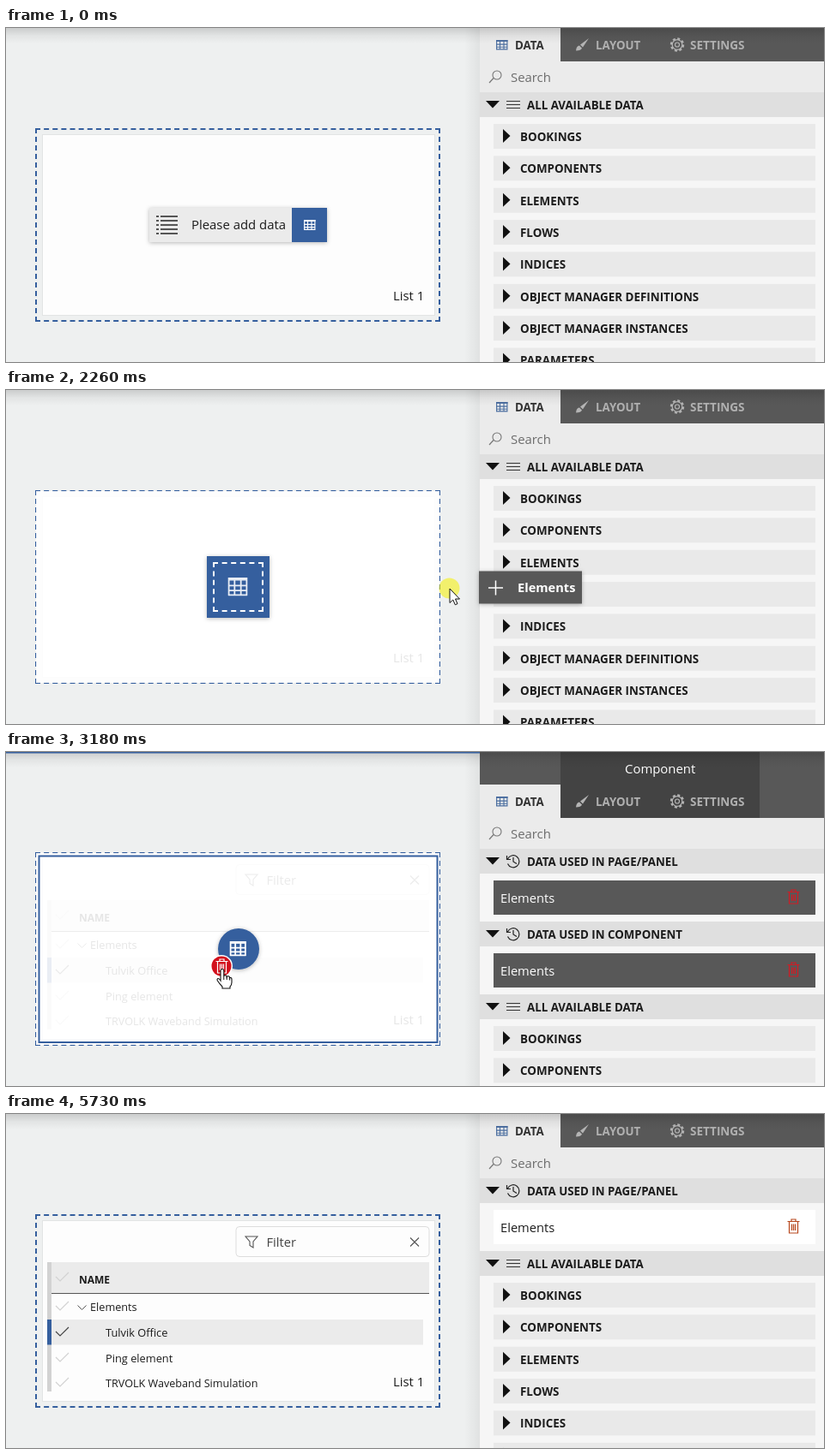
Animation of 953 by 390 pixels, one loop 6.46 s. Source, as an HTML page:

```html
<!DOCTYPE html>
<html lang="en">
<head>
<meta charset="utf-8">
<style>
html, body { margin: 0; width: 100%; height: 100%; overflow: hidden; background: #eef0f0; }
svg { display: block; font: 14.9px "Open Sans", "Noto Sans", sans-serif; }
</style>
</head>
<body>
<svg width="953" height="390" viewBox="0 0 953 390">
  <defs>
    <linearGradient id="top" x2="0" y2="1"><stop stop-opacity=".15"/><stop offset=".5" stop-opacity=".05"/><stop offset="1" stop-opacity="0"/></linearGradient>
    <linearGradient id="side"><stop stop-opacity="0"/><stop offset="1" stop-opacity=".06"/></linearGradient>
    <filter id="shadow" x="-20%" y="-40%" width="140%" height="180%"><feDropShadow dx="0" dy="1" stdDeviation="2.5" flood-opacity=".28"/></filter>
  </defs>
  <g id="scene"></g>
</svg>
<script>
const LOOP = 6460, BLUE = '#355f9e', DARK = '#585858', INK = '#1c1c1c';
const scene = document.getElementById('scene');
const ROWS = ['BOOKINGS', 'COMPONENTS', 'ELEMENTS', 'FLOWS', 'INDICES',
  'OBJECT MANAGER DEFINITIONS', 'OBJECT MANAGER INSTANCES', 'PARAMETERS'];

// Motion advances in short ticks inside these spans and rests between them.
const SPANS = [[730, 1640], [1840, 2820], [2970, 3590], [3590, 4270], [4340, 4340], [5660, 5730]];
const PATH = [[730, 652, 360], [1150, 669, 238], [1360, 674, 212], [1500, 674, 202], [1800, 674, 202],
  [1840, 664, 203], [2260, 517, 232], [2470, 394, 240], [2640, 267, 249], [2680, 267, 249],
  [2820, 252, 249], [2970, 252, 249], [3040, 252, 254], [3250, 252, 254], [3520, 238, 345],
  [3800, 229, 360], [5600, 229, 360], [5660, 246, 372]];

const clamp = v => Math.max(0, Math.min(1, v));
const ramp = (t, a, b) => { const u = clamp((t - a) / (b - a)); return u * u * (3 - 2 * u); };

function tick(t) {
  let q = 0;
  for (const [a, b] of SPANS) if (t >= a) q = Math.min(b, a + Math.floor((t - a) / 70) * 70);
  return q;
}

function cursorAt(t) {
  const i = PATH.findIndex(p => p[0] >= t);
  if (i < 0) return PATH[PATH.length - 1].slice(1);
  if (!i) return PATH[0].slice(1);
  const [a, x, y] = PATH[i - 1], [b, X, Y] = PATH[i], u = (t - a) / (b - a);
  return [x + (X - x) * u, y + (Y - y) * u];
}

const rect = (x, y, w, h, fill, more = '') => `<rect x="${x}" y="${y}" width="${w}" height="${h}" fill="${fill}" ${more}/>`;
const line = (d, color, w = 1, more = '') => `<path d="${d}" fill="none" stroke="${color}" stroke-width="${w}" ${more}/>`;
const shape = (d, fill, more = '') => `<path d="${d}" fill="${fill}" ${more}/>`;
const disc = (x, y, r, fill, more = '') => `<circle cx="${x}" cy="${y}" r="${r}" fill="${fill}" ${more}/>`;
const text = (x, y, s, fill = INK, size = 14.9, weight = 400) =>
  `<text x="${x}" y="${y}" fill="${fill}" font-size="${size}" font-weight="${weight}">${s}</text>`;
const bold = (x, y, s, fill = INK, size = 13.3) => text(x, y, s, fill, size, 700);
const group = (x, y, body, more = '') => `<g transform="translate(${x} ${y})" ${more}>${body}</g>`;
const fade = (o, body) => o > 0 ? `<g opacity="${o}">${body}</g>` : '';

// A two-pixel dashed border whose sides all start and end with a whole dash.
function dashed(x, y, w, h, color) {
  const side = (d, length) => {
    const n = Math.floor((length + 4) / 10);
    return line(d, color, 2, `stroke-dasharray="6 ${(length - 6 * n) / (n - 1)}"`);
  };
  return side(`M${x} ${y + 1}h${w}`, w) + side(`M${x} ${y + h - 1}h${w}`, w) +
    side(`M${x + 1} ${y}v${h}`, h) + side(`M${x + w - 1} ${y}v${h}`, h);
}

function grid(x, y, w, h, color) {
  const c = w / 3, top = h / 6, r = (h - top) / 3;
  return rect(x, y, w, top, color) +
    line(`M${x + .6} ${y}v${h}M${x + c} ${y}v${h}M${x + 2 * c} ${y}v${h}M${x + w - .6} ${y}v${h}` +
      `M${x} ${y + top + r}h${w}M${x} ${y + top + 2 * r}h${w}M${x} ${y + h - .6}h${w}`, color, w > 16 ? 1.8 : 1.1);
}
const trash = (x, y, color) => group(x, y,
  line('M-7-5.5H7M-2.5-5.5V-8H2.5V-5.5M-5-5.5V8H5V-5.5M-2-2.5V5M0-2.5V5M2-2.5V5', color, 1.2));
const tickMark = (y, color) => line(`M58 ${y}l5 5l10-10`, color, 1.2);

const arrow = shape('M0 0V16.5L3.8 13L6.3 18.8L9 17.6L6.5 12H11.5Z', '#fff', 'stroke="#111"');
const hand = group(0, -1, shape('M-2 14V2.2Q-2 .5-.1 .5Q1.8 .5 1.8 2.2V9Q2 7.6 3.6 7.8Q5.2 8 5.2 9.6Q6 8.4 7.3 8.8' +
  'Q8.6 9.2 8.6 10.6Q11 10 11 12.5V16Q11 19 9 21V23H0V21Q-3 18-5.6 14Q-6.5 12-5 11.5Q-3.6 11.3-2 14Z',
  '#fff', 'stroke="#111" stroke-width="1.1"') + line('M1.8 9V13M5.2 9.6V13M8.6 10.6V13.5', '#111'));

const placeholder =
  `<g filter="url(#shadow)">${rect(167, 210, 166, 40, '#ebebeb')}${rect(333, 210, 41, 40, BLUE)}</g>` +
  [220, 225, 230, 235, 240].map(y => line(`M175 ${y}h3M180 ${y}h20`, '#555', 2)).join('') +
  text(216, 235, 'Please add data') + grid(347, 224, 13.5, 12, '#fff');

const list =
  rect(268, 131.5, 225, 35, '#fdfdfd', 'rx="4" stroke="#ddd"') +
  line('M279 143H293L288 149V156L284 153.500V149Z', '#555', 1.1) + text(303.5, 155, 'Filter', '#444', 14.7) +
  line('M471 144.500l10 10m0-10l-10 10', '#555', 1.1) +
  rect(48, 173, 445, 36, '#ebebeb') + line('M48 209.500H493', '#555', 1.2) +
  rect(48, 173, 5, 151, '#d2d2d2') + rect(48, 240, 438, 29.5, '#ebebeb') + rect(48, 240, 5, 29.5, BLUE) +
  [190, 224, 284, 313].map(y => tickMark(y, '#d2d2d2')).join('') + tickMark(254, '#444') +
  bold(85, 198, 'NAME', INK, 12) + line('M83.500 223.500l5 5l5-5', '#555') +
  text(98, 230, 'Elements', INK, 12.7) + text(116, 260, 'Tulvik Office', INK, 12.8) +
  text(116, 290, 'Ping element', INK, 12.8) + text(116, 319, 'TRVOLK Waveband Simulation', INK, 12.6);

function component(t, over) {
  const dropped = t >= 2970;
  const veil = dropped ? 1 - ramp(t, 3520, 3800) : ramp(t, 1770, 2000);
  const card = rect(42.5, 124.5, 457, 211, '#fdfdfd', 'stroke="#e2e4e4"') +
    (dropped ? list : fade(1 - veil, placeholder)) + text(451, 318, 'List 1');
  const inset = over ? 3 : 7;
  const target = dropped
    ? rect(38.5, 121.5, 464, 217.5, 'none', `stroke="${BLUE}" stroke-width="2"`) +
      disc(271, 230, 24, BLUE, 'filter="url(#shadow)"') + grid(261, 221, 18.5, 17, '#fff') +
      disc(251, 250, 13, '#fff') + disc(251, 250, 11.5, '#d2101c') + trash(251.5, 250, '#fff')
    : rect(234, 194, 73, 72, BLUE, 'filter="url(#shadow)"') +
      dashed(234 + inset, 194 + inset, 73 - 2 * inset, 72 - 2 * inset, '#fff') +
      grid(259, 219, 22, 21, '#e8edf5');
  // The veil hides the inner half of the border.
  return card + dashed(34, 117, 472, 226, BLUE) +
    fade(veil * .89, rect(35, 118, 470, 224, '#fff')) + fade(veil, target);
}

function heading(y, label, history) {
  const icon = history
    ? line(`M584.500 ${y + 12}a7 7 0 1 1 0 5.500M583.500 ${y + 8}v4.500h4.500M591 ${y + 10}v5l4 2.500`, '#222', 1.2)
    : line(`M583 ${y + 10.5}h16m-16 4h16m-16 4h16`, '#333');
  return rect(552, y, 401, 29, '#dfdfdf') + shape(`M559 ${y + 10}h16l-8 8.500z`, '#111') +
    icon + bold(607, y + 20, label);
}

function usedSection(y, label, hot) {
  const on = hot > .5;
  return heading(y, label, true) + rect(568, y + 37, 375, 40, '#fff') +
    fade(hot, rect(568, y + 37, 375, 40, DARK)) +
    text(576, y + 62.5, 'Elements', on ? '#fff' : INK, 14.7) +
    trash(917.5, y + 56, on ? '#d01c24' : '#b8481e');
}

function panel(t) {
  const hot = ramp(t, 2900, 3150) * (1 - ramp(t, 3940, 4340));
  const page = ramp(t, 2900, 3150), d = 38 * hot;
  const floor = y => rect(552, y, 401, 390, '#f6f6f6');
  let y = 75 + d, out = floor(y);
  if (page) {
    out += usedSection(y, 'DATA USED IN PAGE/PANEL', hot);
    y += 85 * page;
    out += floor(y);
  }
  if (hot) {
    out += usedSection(y, 'DATA USED IN COMPONENT', hot);
    y += 85 * hot;
    out += floor(y);
  }
  out += heading(y, 'ALL AVAILABLE DATA') + ROWS.map((name, i) => {
    const r = y + 37 + i * 37.35;
    return rect(568, r, 375, 29, '#e9e9e9') + shape(`M579 ${r + 6}l8.500 8l-8.500 8z`, '#111') +
      bold(599, r + 20, name, INK, 13.4);
  }).join('');

  const tabs = rect(552, 0, 94, 39, '#ebebeb') + rect(552, 39, 401, 36, '#ebebeb') +
    grid(571, 14, 13.5, 11.5, '#4a6d9f') + bold(593, 25, 'DATA', '#333') +
    shape('M679 12L669 19.500L672 22.500ZM668 20.500Q664.500 21 664 26.500Q670 26.500 671 23.500Z', '#b4b4b4') +
    bold(687, 25, 'LAYOUT', '#b0b0b0') +
    disc(782, 19.5, 7, 'none', 'stroke="#b4b4b4" stroke-width="2.4" stroke-dasharray="3 2.5"') +
    disc(782, 19.5, 5.8, 'none', 'stroke="#b4b4b4" stroke-width="1.2"') +
    disc(782, 19.5, 2.5, 'none', 'stroke="#b4b4b4" stroke-width="1.2"') +
    bold(797, 25, 'SETTINGS', '#b0b0b0', 13.5) +
    disc(572, 55, 5, 'none', 'stroke="#777" stroke-width="1.1"') + line('M568 58.500l-5 5.500', '#777', 1.2) +
    text(588, 62.5, 'Search', '#6c6c6c');
  return out + rect(552, 0, 401, 39 + d, DARK) + fade(hot, rect(646, 0, 232, 39 + d, '#434343')) +
    (hot ? text(721, d - 13, 'Component', '#fff') : '') + group(0, d, tabs);
}

function label(x, y, over) {
  const icon = over ? grid(12, 13, 13.5, 12, '#fff') : line('M11 19.500h17M19.500 11v17', '#fff', 1.5);
  return group(x, y, rect(0, 0, 120, 38, over ? BLUE : DARK, 'filter="url(#shadow)"') +
    icon + bold(45, 24.5, 'Elements', '#fff', 14.6));
}

function draw(t) {
  const [x, y] = cursorAt(t), dragging = t >= 1840 && t < 2970;
  const over = dragging && x < 307;
  const pressed = t >= 1570 && t < 2970;
  const pointing = t < 1840 || over || (t >= 2970 && t < 3390);
  let out = rect(0, 0, 953, 390, '#eef0f0') + rect(534, 0, 18, 390, 'url(#side)') + component(t, over) + panel(t) +
    rect(0, 0, 953, 18, 'url(#top)');
  if (t >= 3040 && t < 3590) out += rect(0, 0, 552, 1.5, BLUE);
  if (dragging) out += label(cursorAt(Math.max(1840, t - 40))[0] + 20, y - 20.5, over);
  if (pressed) out += disc(x - .5, y - .5, 12, '#f5f000', 'opacity=".55"');
  if (t >= 730 && t < 5730) out += group(x, y, pointing ? hand : arrow);
  scene.innerHTML = out;
}

let shown = -1;
function frame() {
  const t = tick(performance.now() % LOOP);
  if (t !== shown) draw(shown = t);
  requestAnimationFrame(frame);
}
frame();
</script>
</body>
</html>
```
